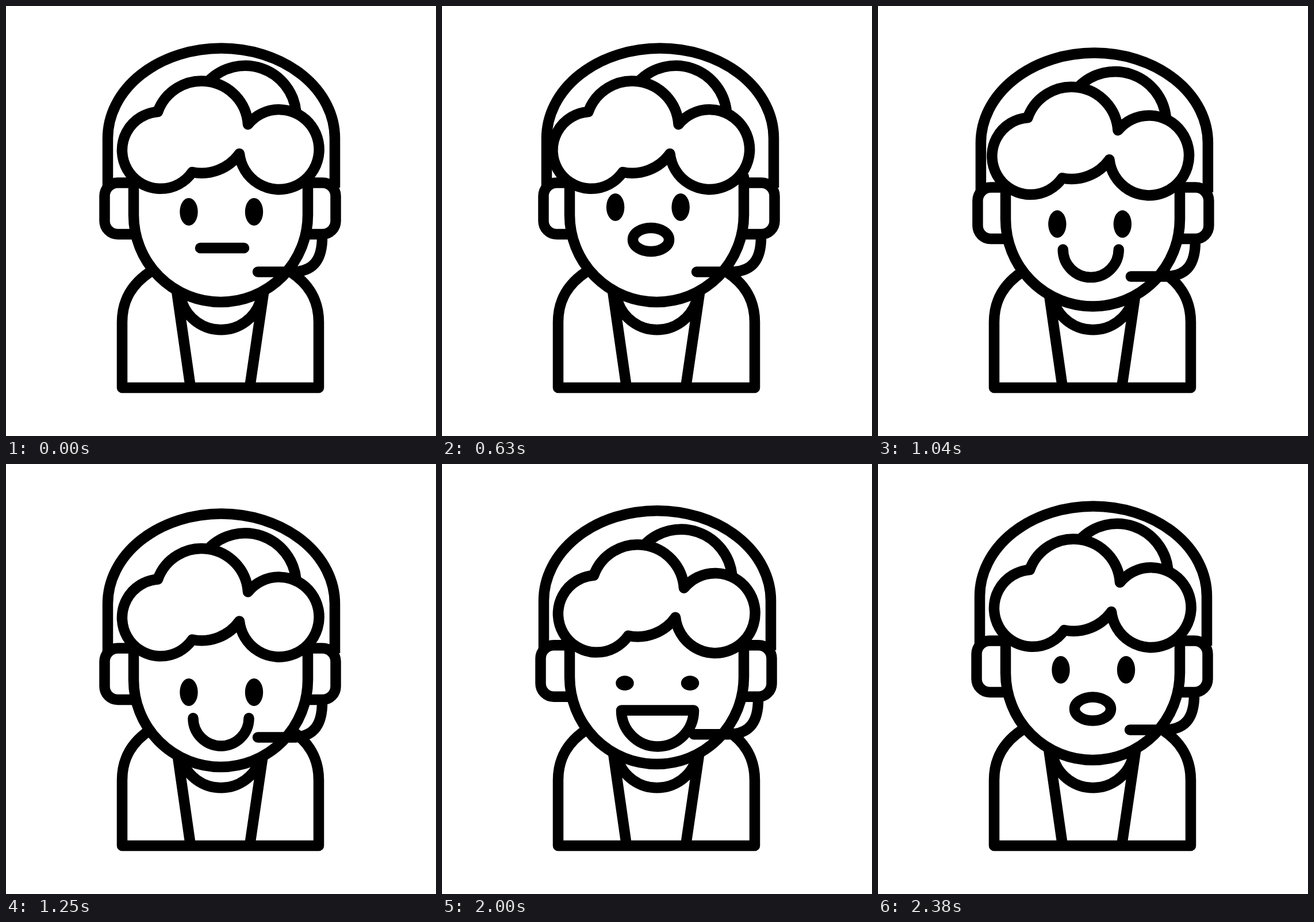
An HTML page that plays this animation: 748 px wide and 748 px high, repeating every 2620 ms.

```html
<!DOCTYPE html>
<html lang="en">
<head>
<meta charset="utf-8">
<title>Call agent</title>
<style>
  html, body { margin: 0; height: 100%; overflow: hidden; background: #fff; }
  svg { display: block; width: 100vw; height: 100vh; }
  .line { fill: none; stroke: #000; stroke-width: 18.5; stroke-linecap: round; stroke-linejoin: round; }
  .solid { fill: #fff; }
</style>
</head>
<body>
<svg viewBox="0 0 748 748" class="line">
  <g id="body">
    <path d="M250 463C222 482 202 508 202 550V664H544V550C544 508 524 482 496 463"/>
    <path d="M297 496L320.5 660M448.500 496L424.500 660M306 515A72 72 0 0 0 442 515"/>
  </g>
  <g class="headset">
    <path d="M177 316V230A197.500 156.500 0 0 1 572 230V316" stroke-linecap="butt"/>
    <path d="M230 307.500H194.500A23 23 0 0 0 171.500 330.500V374A23 23 0 0 0 194.500 397H230"/>
    <path d="M515 307.500H550.500A23 23 0 0 1 573.500 330.500V374A23 23 0 0 1 550.500 397H515"/>
  </g>
  <path id="face" class="solid" d="M222 297V363.500A151.500 151.500 0 0 0 525 363.500V297"/>
  <path class="headset" d="M550 402C550 440 536 462.500 497 462.500H438"/>
  <g id="hair">
    <path d="M352 131A89 89 0 0 1 504.500 184"/>
    <path class="solid" d="M264 184A81 81 0 0 1 421 206A69.500 69.500 0 1 1 406 257A81 81 0 0 1 324 289A67 67 0 1 1 264 184Z"/>
  </g>
  <g id="eyes" fill="#000" stroke="none">
    <ellipse cx="318" cy="358" rx="15.700" ry="24"/>
    <ellipse cx="431.500" cy="358" rx="15.700" ry="24"/>
  </g>
  <path id="mouth"/>
</svg>
<script>
const LOOP = 2620, STEP = 1000 / 24, LAST = 57;

const MOUTHS = {
  flat: "M338 421H414",
  open: "M312 411H438A63 63 0 0 1 312 411Z",
  round: "M342 426A31.500 20.500 0 0 1 405 426A31.500 20.500 0 0 1 342 426Z",
  smile: "M325.500 412.500A48.500 48.500 0 0 0 422.500 412.500"
};
// Start step of each mouth shape
const SPEECH = [[0, "flat"], [4, "open"], [14, "round"], [25, "smile"], [34, "flat"], [43, "open"], [52, "round"]];

// Offset of each part when looking aside (x, y) and down (y)
const PARTS = [
  [".headset", 5, 0, 13],
  ["#face", 0, 0, 12],
  ["#hair", -9.5, 0, 16.5],
  ["#eyes", -16.4, -8, 39],
  ["#mouth", -10, -19.5, 29.5]
].map(([selector, ...offsets]) => [document.querySelectorAll(selector), ...offsets]);

const eyes = document.querySelectorAll("#eyes ellipse");
const mouth = document.querySelector("#mouth");

function ease(step, from, to) {
  const u = Math.min(1, Math.max(0, (step - from) / (to - from)));
  return u * u * (3 - 2 * u);
}

function draw(time) {
  const step = Math.min(LAST, Math.floor((time % LOOP + 6) / STEP));
  const turn = ease(step, 18, 30);
  const aside = ease(step, 0, 12) - turn;
  const down = turn - ease(step, 41, 57);
  const blink = ease(step, 46, 50) - ease(step, 50, 54);

  for (const [nodes, x, y, drop] of PARTS)
    for (const node of nodes)
      node.setAttribute("transform", `translate(${aside * x} ${aside * y + down * drop})`);

  for (const eye of eyes) eye.setAttribute("ry", 24 * (1 - 0.92 * blink));

  const [, shape] = SPEECH.findLast(([start]) => start <= step);
  mouth.setAttribute("d", MOUTHS[shape]);
}

let begin;
function tick(now) {
  begin ??= now;
  draw(now - begin);
  requestAnimationFrame(tick);
}
draw(0);
requestAnimationFrame(tick);
</script>
</body>
</html>
```
